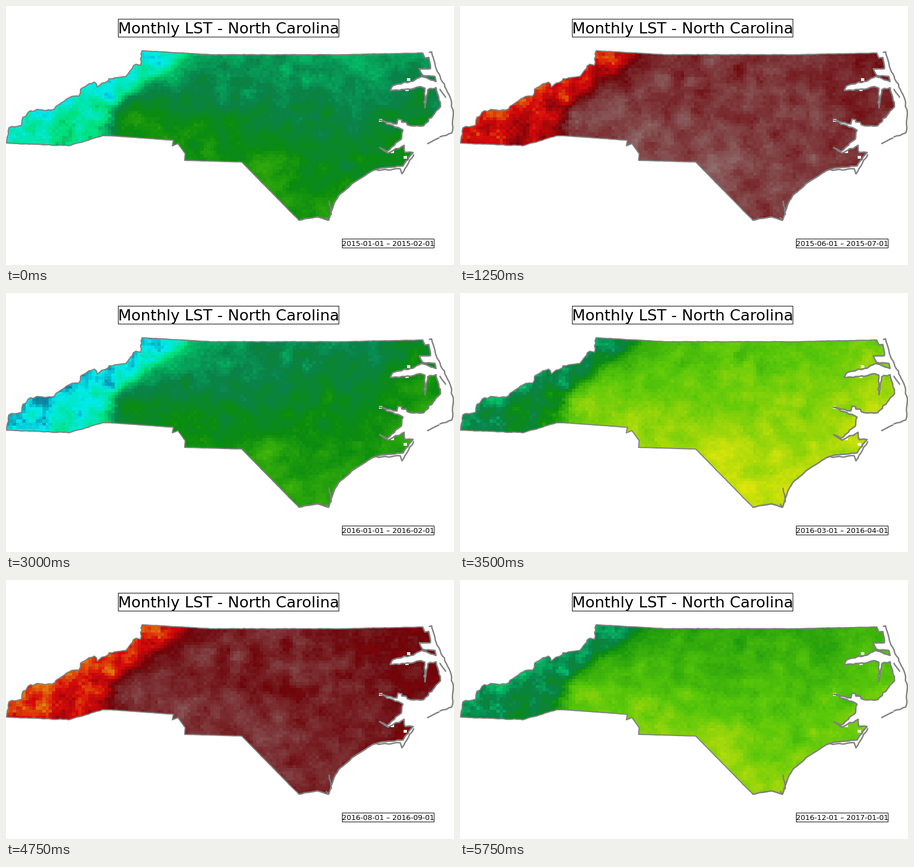
Recreate the animation shown at these times as a matplotlib script. Size 800x463 px, loop 6 s.

```python
import numpy as np
import matplotlib.pyplot as plt
from matplotlib.animation import FuncAnimation
from matplotlib.patches import Polygon, Rectangle

W, H, DPI = 800, 463, 100
MONTHS, STEP = 24, 250
PX = 72 / DPI
GREY = "#808080"

# Colour scale: degrees, then rgb
STOPS = [
    (2, 10, 130, 160), (4, 0, 235, 240), (7, 0, 225, 120), (10, 10, 130, 75),
    (12, 10, 140, 15), (16, 90, 200, 10), (20, 225, 230, 10),
    (24, 225, 110, 10), (26, 215, 10, 10), (29, 110, 5, 10),
    (33, 146, 118, 118),
]


def colour(t):
    deg, *rgb = np.array(STOPS, float).T
    return np.stack([np.interp(t, deg, c) for c in rgb], axis=-1) / 255


# ---------- state outline ----------
def fray(pts, amp, seed, step=5):
    """Subdivide a line and jitter the inserted points."""
    rng = np.random.default_rng(seed)
    pts = np.array(pts, float)
    out = []
    for p, q in zip(pts[:-1], pts[1:]):
        n = max(1, int(np.hypot(*(q - p)) / step))
        out.append(p)
        out += [p + (q - p) * k / n + rng.normal(0, amp, 2)
                for k in range(1, n)]
    return np.array(out + [pts[-1]])


NORTH = [(243, 80), (370, 87), (600, 87), (744, 84)]
SOUNDS = [(744, 84), (748, 93), (755, 92), (758, 112), (738, 112), (744, 124),
          (766, 126), (768, 135), (742, 126), (722, 135), (690, 143),
          (686, 151), (722, 149), (740, 144), (748, 147), (748, 182),
          (753, 150), (768, 146), (776, 180), (746, 214), (722, 214),
          (700, 202), (698, 211), (667, 204), (709, 222), (706, 238),
          (680, 260), (667, 253), (682, 263), (711, 249), (713, 262),
          (727, 262), (709, 286)]
SOUTH = [(709, 286), (668, 290), (655, 294), (622, 315), (594, 339),
         (586, 353), (576, 383), (556, 377), (523, 383)]
BORDER = [(523, 383), (421, 279), (319, 276), (320, 264), (307, 246),
          (297, 250), (299, 240), (186, 232)]
WEST = [(186, 232), (172, 232), (112, 250), (1, 245), (5, 218)]
PEAKS = [(5, 218), (28, 213), (30, 199), (44, 187), (82, 186), (113, 164),
         (130, 161), (133, 149), (158, 136), (163, 145), (184, 130),
         (214, 126), (232, 104), (240, 106), (243, 80)]
PARTS = [(NORTH, .2), (SOUNDS, .9), (SOUTH, .3), (BORDER, .1), (WEST, .4),
         (PEAKS, 1.1)]
BANKS = [
    [(756, 83), (760, 82), (770, 117), (793, 163), (799, 190), (796, 227),
     (775, 234)],
    [(773, 236), (753, 246)],
    [(775, 149), (785, 163)],
    [(655, 294), (704, 291), (707, 300), (728, 266)],
    [(577, 349), (581, 373)],
    [(572, 378), (576, 383)],
]
outline = np.vstack([fray(p, a, i)[:-1] for i, (p, a) in enumerate(PARTS)])

# ---------- temperature model ----------
COLS, ROWS = 136, 56
X0, X1, Y0, Y1 = 0, 800, 78, 386
gx, gy = np.meshgrid(X0 + (np.arange(COLS) + .5) * (X1 - X0) / COLS,
                     Y0 + (np.arange(ROWS) + .5) * (Y1 - Y0) / ROWS)


def noise(seed, blur):
    a = np.random.default_rng(seed).normal(size=(ROWS, COLS))
    for _ in range(blur):
        a = (a + np.roll(a, 1, 0) + np.roll(a, -1, 0)
             + np.roll(a, 1, 1) + np.roll(a, -1, 1)) / 5
    return a / a.std()


def spots(r, *centres):
    return sum(np.exp(-((gx - x) ** 2 + (gy - y) ** 2) / (2 * r * r))
               for x, y in centres)


# Terrain: mountains west of a bent edge, foothills beyond, a high north rim
edge = 190 + np.clip(180 - gy, 0, None) * 1.37
mount = 1 / (1 + np.exp((gx - edge) / 9))
foot = (1 - mount) * np.exp(-np.clip(gx - edge, 0, None) / 35) * (gy < 190)
rim = mount * np.exp(-np.clip(gy - 210 + .58 * (gx - 30), 0, None) / 28)
coast = np.clip((gx - 640) / 80, 0, 1)
east = (gx - 400) / 400
south = (gy - 220) / 130 * (1 - .6 * mount)

plains = spots(36, (240, 215), (348, 245), (468, 290))
towns = spots(9, (317, 232), (365, 130), (410, 137), (490, 150), (515, 165),
              (485, 250), (580, 150), (630, 190))
summits = spots(9, (187, 165), (130, 212), (100, 183), (70, 235))
texture = (.16 * noise(1, 0) + .28 * noise(2, 4)) * (1 + 1.2 * mount)

# Weather drift between a few key months
KEY = [0, 5, 9, 12, 16, 19, 23]
ANOMALY = [0, .3, -.9, 0, .2, -1.2, 1]
EASTWARD = [-.8, -.2, .1, 1.3, .7, -.1, 0]


def temperature(m):
    s = np.cos(2 * np.pi * (m - 6.3) / 12)
    t = 24.7 + 10.3 * s - 3.6 * s * s + np.interp(m, KEY, ANOMALY)
    t = t + np.interp(m, KEY, EASTWARD) * east + .9 * (1 - s) * south
    t += (.9 - .3 * s) * plains + .5 * (1 + s) * towns - .9 * s * coast
    t -= (4.5 - .7 * s) * mount + 1.2 * foot + 1.3 * rim + 1.2 * summits
    return t + texture + .07 * noise(100 + m, 0) + .25 * noise(200 + m, 6)


maps = [colour(temperature(m)) for m in range(MONTHS)]


def label(m):
    a, b = [f"{2015 + k // 12}-{k % 12 + 1:02d}-01" for k in (m, m + 1)]
    return f"{a} – {b}"


# ---------- stage ----------
plt.rcParams["font.family"] = "DejaVu Sans"
fig = plt.figure(figsize=(W / DPI, H / DPI), dpi=DPI, facecolor="white")
ax = fig.add_axes([0, 0, 1, 1])
raster = ax.imshow(maps[0], extent=(X0, X1, Y1, Y0), interpolation="nearest",
                   aspect="auto")
ax.set_xlim(0, W)
ax.set_ylim(H, 0)
ax.axis("off")

land = Polygon(outline, closed=True, fill=False, edgecolor=GREY,
               linewidth=2 * PX, joinstyle="round", zorder=3)
ax.add_patch(land)
raster.set_clip_path(land)

# Cells without data
for x, y in [(716, 129), (666, 202), (713, 147), (687, 258), (710, 268)]:
    ax.add_patch(Rectangle((x, y), 6, 5, color="white", lw=0, zorder=2))

# Shorelines are drawn heavier than the land border
for i, pts in enumerate([SOUNDS, SOUTH] + BANKS):
    seed, amp = (1, .9) if i == 0 else (2, .3) if i == 1 else (50 + i, .5)
    ax.plot(*fray(pts, amp, seed).T, color=GREY, lw=2.5 * PX, zorder=4,
            solid_joinstyle="round", solid_capstyle="round")


def boxed(x, y, w, h, base, size, text):
    ax.add_patch(Rectangle((x + .5, y + .5), w, h, facecolor="white",
                           edgecolor="black", lw=PX, snap=False, zorder=5))
    return ax.text(x, base, text, fontsize=size * PX, color="black",
                   ha="left", va="baseline", zorder=6)


boxed(200, 23, 394, 32, 49, 27.48, "Monthly LST - North Carolina")
dates = boxed(600, 416, 164, 16, 429, 12.93, label(0))


def update(m):
    raster.set_data(maps[m])
    dates.set_text(label(m))
    return raster, dates


anim = FuncAnimation(fig, update, frames=MONTHS, interval=STEP, repeat=True,
                     repeat_delay=0, blit=False)
plt.show()
```
